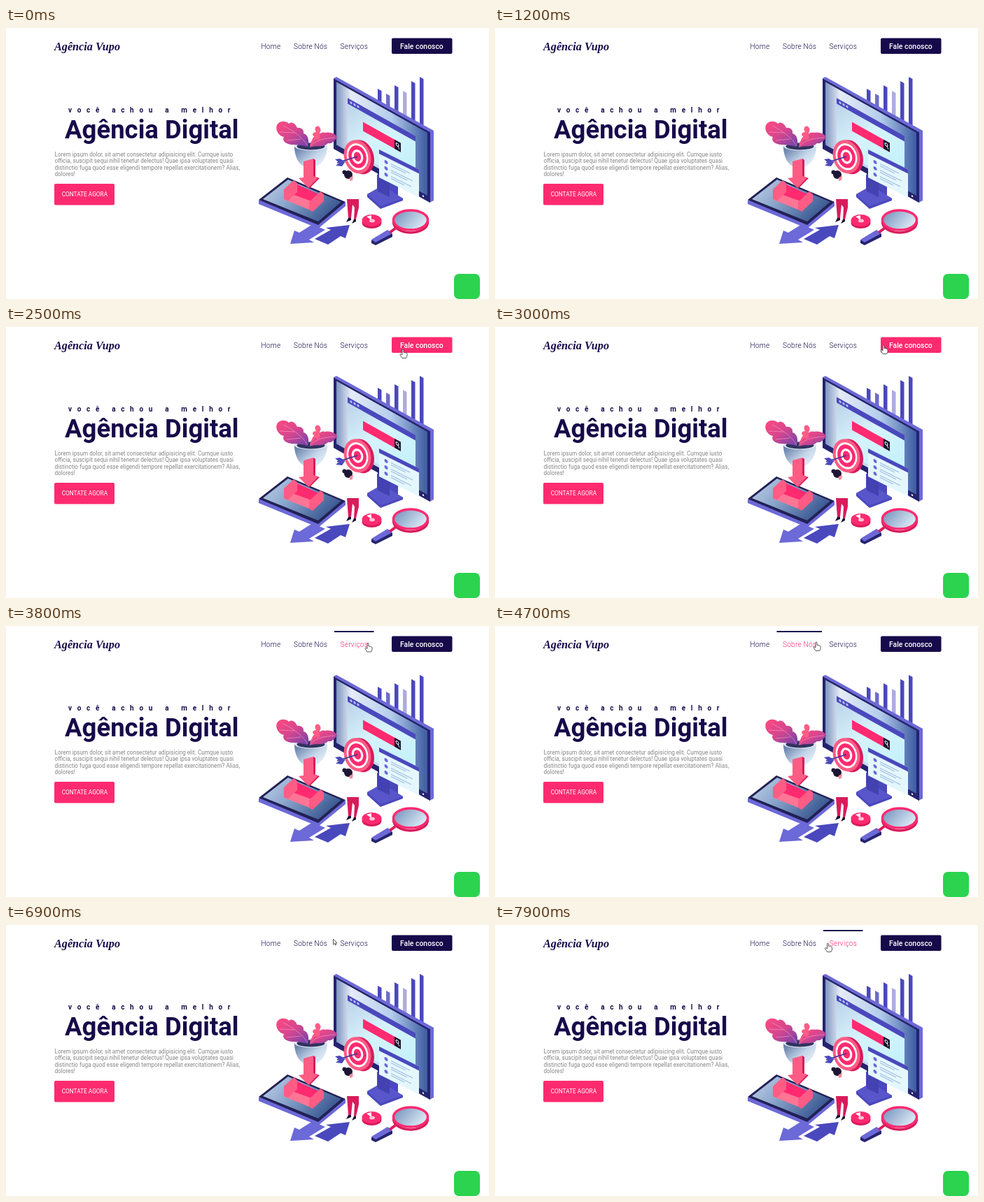
Animation, 690 px wide and 388 px high, one loop 8000 ms. Source, as an HTML page:

```html
<!DOCTYPE html>
<html lang="pt">
<head>
<meta charset="utf-8">
<title>Agência Digital</title>
<style>
html, body { margin: 0; width: 100%; height: 100%; overflow: hidden; background: #fff; }
svg { display: block; width: 690px; height: 388px; font-family: Roboto, sans-serif; }
.navy { fill: #170a4a; }
.pink { fill: #ff2a70; }
.coral { fill: #ff5c85; }
.rose { fill: #d91b5c; }
.blue { fill: #25236f; }
.violet { fill: #4a48bd; }
.lilac { fill: #6c69d8; }
.white { fill: #fff; }
.links { font-size: 10.1px; letter-spacing: .22px; font-weight: 300; }
.lead { font-size: 8.17px; fill: #858585; }
</style>
</head>
<body>
<svg viewBox="0 0 690 388">
  <defs>
    <linearGradient id="screen">
      <stop stop-color="#7e96c0"/><stop offset=".16" stop-color="#e6ecf7"/>
      <stop offset=".6" stop-color="#b4cdec"/><stop offset="1" stop-color="#3c5ba2"/>
    </linearGradient>
    <linearGradient id="page" x2="1" y2=".6">
      <stop stop-color="#b9cfe8"/><stop offset=".5" stop-color="#d6f3fb"/><stop offset="1" stop-color="#c3f1fb"/>
    </linearGradient>
    <linearGradient id="tablet" x2="1" y2=".5">
      <stop stop-color="#c3d3e8"/><stop offset=".45" stop-color="#8ba6cc"/><stop offset="1" stop-color="#3d5b94"/>
    </linearGradient>
    <linearGradient id="lens" x2="1" y2=".5">
      <stop stop-color="#6f8bb8"/><stop offset="1" stop-color="#d9e9f5"/>
    </linearGradient>
    <linearGradient id="pot" x2="1" y2=".8">
      <stop stop-color="#57709f"/><stop offset=".6" stop-color="#c4d6ea"/><stop offset="1" stop-color="#eef5fb"/>
    </linearGradient>
    <linearGradient id="leaf" x2="1" y2="1">
      <stop stop-color="#ff4a80"/><stop offset=".5" stop-color="#d4468f"/><stop offset="1" stop-color="#6b43b0"/>
    </linearGradient>
  </defs>

  <text x="69" y="32" class="navy" font-family="'Liberation Serif', serif" font-size="16.2" font-weight="bold" font-style="italic">Agência Vupo</text>
  <g id="nav" class="links"></g>
  <rect id="cta" x="551" y="14.5" width="86.5" height="22.5" rx="2"/>
  <text x="563" y="29.6" class="white" font-size="10.4" font-weight="500">Fale conosco</text>

  <text x="89" y="121" class="navy" font-size="10" font-weight="bold" letter-spacing="7.68">você achou a melhor</text>
  <text x="84" y="158" class="navy" font-size="36.5" font-weight="bold">Agência Digital</text>
  <g class="lead">
    <text x="69.5" y="183.7">Lorem ipsum dolor, sit amet consectetur adipisicing elit. Cumque iusto</text>
    <text x="69.5" y="193.2">officia, suscipit sequi nihil tenetur delectus! Quae ipsa voluptates quasi</text>
    <text x="69.5" y="202.7">distinctio fuga quod esse eligendi tempore repellat exercitationem? Alias,</text>
    <text x="69.5" y="212.2">dolores!</text>
  </g>
  <rect x="69" y="223" width="86" height="30.5" rx="2" class="pink"/>
  <text x="79.7" y="241.2" class="white" font-size="8.3">CONTATE AGORA</text>

  <!-- chart bars behind the monitor -->
  <g id="bars" class="violet"></g>

  <!-- monitor -->
  <path class="violet" d="M516 238 530 230V210L560 222V240L567 244V247L535 259 516 242Z"/>
  <path fill="#5956cb" d="M516 238 538 226 567 244 535 255Z"/>
  <path fill="#4441b0" d="M531 205H548V242L531 234Z"/>
  <path class="lilac" d="M468 72 472 70 611 147V247L605 250V149Z"/>
  <g transform="matrix(1 .56 0 1 468 72)">
    <rect width="138" height="101" class="blue"/>
    <rect x="4" y="3" width="130" height="90" fill="url(#screen)"/>
    <rect x="20" y="17" width="97" height="72" fill="url(#page)"/>
    <rect x="20" y="17" width="97" height="8" class="violet"/>
    <g fill="#b9c4f5">
      <circle cx="25" cy="21" r="1.7"/><circle cx="30" cy="21" r="1.7"/><circle cx="35" cy="21" r="1.7"/>
    </g>
    <rect x="42" y="39" width="54" height="13" class="pink"/>
    <rect x="87" y="39" width="9" height="13" fill="#17142e"/>
    <circle cx="91" cy="44" r="2" fill="none" stroke="#fff"/><path d="M92 46 94 49" stroke="#fff"/>
    <circle cx="128" cy="97" r="1.2" class="white"/>
  </g>
  <g transform="matrix(1 .5 0 1 533 174)">
    <rect width="57" height="40" fill="#e4f7fd"/>
    <rect width="57" height="6" class="violet"/>
    <g class="lilac">
      <circle cx="10" cy="13" r="2.5"/><circle cx="10" cy="22" r="2.5"/><circle cx="10" cy="31" r="2.5"/>
    </g>
    <path d="M17 12H44M17 15H38M17 21H48M17 24H40M17 30H46M17 33H36" stroke="#90b0d8"/>
  </g>

  <!-- target and dart -->
  <g transform="rotate(-16 503 184)">
    <ellipse cx="507" cy="186" rx="18" ry="25" class="rose"/>
    <ellipse cx="502" cy="184" rx="19" ry="24.500" class="coral"/>
    <ellipse cx="502" cy="184" rx="15" ry="19.500" class="white"/>
    <ellipse cx="502" cy="184" rx="12.500" ry="16.500" class="pink"/>
    <ellipse cx="502" cy="184" rx="8" ry="10.500" class="white"/>
    <ellipse cx="502" cy="184" rx="5" ry="7" class="pink"/>
  </g>
  <path d="M473 193 502 184" stroke="#373491" stroke-width="1.5"/>
  <path class="violet" d="M470 188 477 187 484 191 476 193ZM471 197 476 193 485 191 480 198Z"/>

  <!-- plant -->
  <path fill="url(#pot)" d="M412 169C412 186 420 200 434 201C449 200 459 186 459 169Z"/>
  <ellipse cx="435.500" cy="169" rx="23.500" ry="6.500" fill="#dfe9f3"/>
  <ellipse cx="435.500" cy="169.500" rx="20" ry="5" fill="#30345f"/>
  <g fill="url(#leaf)">
    <path d="M431 170C423 168 416 167 408 167C399 166 394 161 397 156C390 155 384 146 387 139C391 132 400 133 404 137C409 133 414 138 416 143C422 142 426 146 425 151C431 152 434 161 431 170Z"/>
    <path d="M434 171C438 163 435 160 441 155C449 154 448 148 456 150C464 148 474 153 473 158C468 161 467 166 460 165C454 172 443 167 434 171Z"/>
  </g>
  <path class="coral" d="M434 169C435 162 438 160 441 156C436 153 438 149 443 149C439 143 444 138 448 142C452 147 447 149 448 154C450 160 444 161 442 159C437 163 437 166 434 169Z"/>
  <path d="M396 140C411 147 425 158 431 169M391 149 412 150M401 161 421 159M434 170C443 159 456 158 470 157" fill="none" stroke="#ffa0c4" stroke-width=".6"/>

  <!-- tablet with tray -->
  <path class="lilac" d="M361 247 400 220 485 250V255L446 287 361 252Z"/>
  <path fill="#222055" d="M361 246 402 214 485 249 446 282Z"/>
  <path fill="url(#tablet)" d="M367 245 403 217 479 249 446 277Z"/>
  <path class="pink" d="M398 236 414 223 453 241 438 256Z"/>
  <path fill="#ff7595" d="M398 234 442 250 438 262 398 246Z"/>
  <path class="coral" d="M397 231 411 218 416 222V235L403 247 397 245ZM433 249 449 234 454 238V248L438 263 433 260Z"/>
  <path class="rose" d="M439 187 442 189V213L448 215 433 230V221L439 213Z"/>
  <path class="coral" d="M425 191 439 187V212L446 214 432 229 418 215 425 214Z"/>

  <!-- person -->
  <path class="white" d="M488 216 498 217 504 246 487 246Z"/>
  <g fill="#1c1534"><circle cx="489" cy="210" r="6"/><circle cx="483.500" cy="206.500" r="3"/></g>
  <path fill="#f48a99" d="M491 214 496 212 495 218 491 219Z"/>
  <path class="rose" d="M487 245H504V257L500 274H497L498 257 495 253 493 272H489Z"/>
  <path fill="#1c1534" d="M489 272H493V275L486 278ZM497 274H500V277L494 280Z"/>

  <!-- two arrows -->
  <path class="lilac" d="M406 309 412 290 419 293 438 281 456 289 433 303 440 307Z"/>
  <path class="violet" d="M491 282 485 301 478 298 460 310 441 302 464 289 457 286Z"/>

  <!-- pie and magnifier -->
  <ellipse cx="522.500" cy="279" rx="14" ry="8" class="rose"/>
  <ellipse cx="522.500" cy="275.500" rx="14" ry="8.500" class="pink"/>
  <path class="white" d="M522 275 515 270 522 268Z"/>
  <ellipse cx="523" cy="276" rx="4" ry="2.500" fill="#ffc2d5"/>
  <path class="blue" d="M522 304 546 290 552 295V299L528 311 522 308Z"/>
  <path class="lilac" d="M522 303 545 289 552 294 528 307Z"/>
  <path d="M548 293 556 287" stroke="#d91b5c" stroke-width="4"/>
  <ellipse cx="578" cy="278" rx="24.500" ry="15" fill="none" stroke="#d91b5c" stroke-width="3.500"/>
  <ellipse cx="578" cy="275" rx="24.500" ry="14" fill="url(#lens)" stroke="#ff2a70" stroke-width="3.500"/>

  <rect x="640" y="352" width="37" height="36" rx="7" fill="#2bd34f"/>

  <g id="cursor" stroke="#333" stroke-width=".8" stroke-linejoin="round" fill="#fff">
    <path id="hand" d="M-1 1Q0-.5 1 1V5Q2 4 3 5.300Q4 4.600 4.700 6Q6 5.600 6 7V10L4.500 13H-1L-4 8.500Q-4 7 -3 7L-1 8.500Z"/>
    <path id="arrow" d="M0 0V8L1.800 6.400 3 9 4.200 8.500 3 5.900H5.500Z"/>
  </g>
</svg>
<script>
const $ = id => document.getElementById(id);
const navy = '#170a4a', pink = '#ff2a70';

// label, text x, hover area left and right
const links = [['Home', 364.5, 356, 401], ['Sobre Nós', 411, 402.5, 467], ['Serviços', 477.5, 469, 525.5]];
$('nav').innerHTML = links.map(([label, x, l, r]) =>
  `<rect x="${l}" y="7" width="${r - l}" height="2" fill="${navy}"/><text x="${x}" y="29.5">${label}</text>`).join('');
const items = [...$('nav').querySelectorAll('text')];

// bar top and opacity
const bars = [[87, 1], [94, .8], [82, 1], [90, .45], [76, 1], [70, 1]];
$('bars').innerHTML = bars.map(([top, alpha], i) => {
  const x = 531 + 12 * i, end = 106 + 6.7 * i;
  return `<path opacity="${alpha}" d="M${x} ${top}l5.500 3V${end + 3}l-5.500-3Z"/>`;
}).join('');

// pointer path: time, x, y
const path = [
  [1500, 602, 392], [1900, 590, 190], [2200, 575, 40], [2500, 567, 31.5], [2700, 567, 31.5],
  [3000, 555, 25.5], [3500, 555, 25.5], [3600, 546, 25], [4000, 488, 23], [4200, 488, 23],
  [4400, 459, 22.5], [4700, 459, 22.5], [5200, 382, 22], [5400, 382, 22], [5800, 415.5, 19.5],
  [6300, 450, 20.5], [6400, 466, 21], [6500, 466, 21], [6600, 466, 22], [6800, 466, 22],
  [6900, 467.5, 20], [7000, 467.5, 20], [7100, 467.5, 19], [7200, 467.5, 19],
  [7300, 471, 22], [7600, 482, 22], [7800, 482, 22], [7900, 475.5, 25.5]
];

function pointer(t) {
  const i = path.findIndex(p => p[0] > t);
  if (i === 0) return [0, -50];
  if (i < 0) return path[path.length - 1].slice(1);
  const [a, x, y] = path[i - 1], [b, x2, y2] = path[i], k = (t - a) / (b - a);
  return [x + (x2 - x) * k, y + (y2 - y) * k];
}

function draw(now) {
  const t = Math.floor(now % 8000 / 100) * 100;
  const [x, y] = pointer(t);
  let over = x >= 551 && x <= 637.5 && y >= 14.5 && y <= 37;
  $('cta').setAttribute('fill', over ? pink : navy);
  links.forEach(([, , l, r], i) => {
    const hot = x >= l && x < r && y > 7 && y < 45;
    items[i].setAttribute('fill', hot ? pink : navy);
    items[i].previousSibling.setAttribute('opacity', +hot);
    over ||= hot;
  });
  $('hand').setAttribute('opacity', +over);
  $('arrow').setAttribute('opacity', +!over);
  $('cursor').setAttribute('transform', `translate(${x} ${y})`);
  requestAnimationFrame(draw);
}
draw(0);
</script>
</body>
</html>
```
